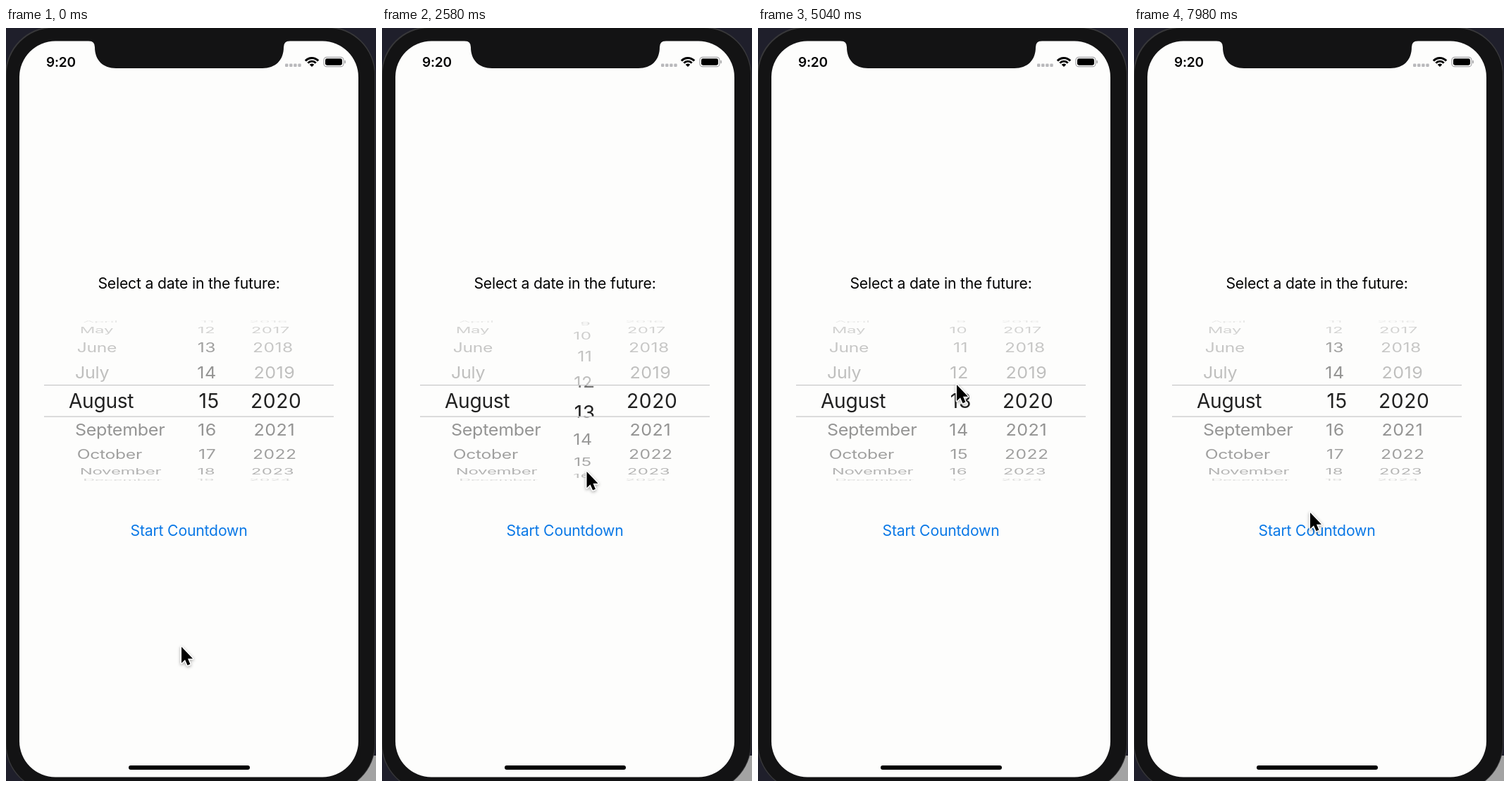
Write an HTML page with a canvas that moves like this. It is 525 px wide and 1066 px high and loops after 8000 ms.

```html
<!DOCTYPE html>
<html lang="en">
<head>
<meta charset="utf-8">
<style>
  html, body { margin: 0; width: 100%; height: 100%; overflow: hidden; background: #1f1f2b; }
  canvas { display: block; }
</style>
</head>
<body>
<canvas id="stage" width="525" height="1066"></canvas>
<script>
const ctx = document.getElementById('stage').getContext('2d');
const LOOP = 8000;
const MONTHS = 'January February March April May June July August September October November December'.split(' ');

// Tracks of [time, value], eased between neighbours
const cursorX = [[250, 249], [1100, 278], [1400, 278], [2500, 290.5], [4100, 290.5], [4800, 282], [6300, 282], [7000, 284], [7250, 284], [7960, 250]];
const cursorY = [[250, 876], [1100, 530], [1400, 530], [3074, 654], [4100, 654], [4800, 505], [5100, 505], [6000, 426], [6500, 426], [7000, 419], [7250, 419], [7960, 686]];
const dayTrack = [[1400, 15], [3074, 12], [3150, 12], [3550, 13], [5100, 13], [6253, 15]];

function sample(track, t) {
  const i = track.findIndex(key => key[0] > t);
  if (i === 0) return track[0][1];
  if (i < 0) return track[track.length - 1][1];
  const [t0, a] = track[i - 1], [t1, b] = track[i];
  const u = (t - t0) / (t1 - t0);
  return a + (b - a) * u * u * (3 - 2 * u);
}

function text(str, x, y, size, color, align = 'left', weight = 400, spacing = -0.009) {
  ctx.font = `${weight} ${size}px Inter, Roboto, sans-serif`;
  ctx.letterSpacing = size * spacing + 'px';
  ctx.textAlign = align;
  ctx.fillStyle = color;
  ctx.fillText(str, x, y);
}

function box(x, y, w, h, r, color) {
  ctx.beginPath();
  ctx.roundRect(x, y, w, h, r);
  ctx.fillStyle = color;
  ctx.fill();
}

function drawPhone() {
  ctx.fillStyle = '#1f1f2b';
  ctx.fillRect(0, 0, 525, 1066);
  ctx.fillStyle = '#a3a3a3';
  ctx.fillRect(480, 1030, 45, 36);
  box(-1, -2, 525, 1083, 68, '#38383a');
  box(0.5, 0, 522.5, 1080, 67, '#131314');
  box(19, 18.5, 481, 1042, 51, '#fdfdfc');

  ctx.beginPath();
  ctx.moveTo(117, 18);
  ctx.quadraticCurveTo(126, 18.5, 126, 27);
  ctx.bezierCurveTo(126, 46, 138, 57, 156, 57);
  ctx.lineTo(364, 57);
  ctx.bezierCurveTo(382, 57, 394, 46, 394, 27);
  ctx.quadraticCurveTo(394, 18.5, 403, 18);
  ctx.fillStyle = '#131314';
  ctx.fill();
  box(174, 1044, 172, 6, 3, '#000');
}

function drawStatus() {
  text('9:20', 57, 55, 19, '#000', 'left', 600);
  for (let i = 0; i < 4; i++) box(396 + i * 6.1, 50.5, 4.4, 4.4, 1.2, '#b9b9bc');

  const wedge = (r0, r1) => {
    ctx.beginPath();
    ctx.arc(434, 55, r1, -Math.PI * 0.76, -Math.PI * 0.24);
    ctx.arc(434, 55, r0, -Math.PI * 0.24, -Math.PI * 0.76, true);
    ctx.fillStyle = '#000';
    ctx.fill();
  };
  wedge(0, 4.6);
  wedge(6.4, 9.2);
  wedge(11, 14);

  ctx.beginPath();
  ctx.roundRect(451, 41.3, 28, 13.4, 4);
  ctx.strokeStyle = '#a5a5a7';
  ctx.lineWidth = 1.2;
  ctx.stroke();
  box(453, 43.3, 24, 9.4, 2.4, '#000');
  box(480.3, 45.7, 1.6, 4.6, 1, '#a5a5a7');
}

const CENTER_X = 259.5, CENTER_Y = 528, RADIUS = 113, STEP = 20.9 * Math.PI / 180;
const BAND_TOP = 505.5, BAND_BOTTOM = 550;

function drawRows(col, magnified) {
  const near = Math.round(col.value);
  for (let n = near - 5; n <= near + 5; n++) {
    const angle = (n - col.value) * STEP;
    if (Math.abs(angle) > 1.55) continue;
    const depth = Math.cos(angle);
    const scale = 1 / (1 + RADIUS * (1 - depth) / 1240);
    const enabled = n >= col.min;
    const alpha = magnified ? (enabled ? 0.87 : 0.55)
                            : (enabled ? 0.43 : 0.25) * depth ** 0.5;
    ctx.save();
    ctx.translate(CENTER_X, CENTER_Y + RADIUS * Math.sin(angle));
    ctx.scale(scale, scale * Math.max(depth, 0.12));
    text(col.label(n), col.x - CENTER_X, 9, 25.2, `rgba(0,0,0,${alpha})`, col.align, 400, col.spacing);
    ctx.restore();
  }
}

function clipped(y0, y1, draw) {
  ctx.save();
  ctx.beginPath();
  ctx.rect(50, y0, 420, y1 - y0);
  ctx.clip();
  draw();
  ctx.restore();
}

function drawPicker(day) {
  const columns = [
    { value: 7, min: 7, x: 97, pivot: 165, align: 'left', spacing: -0.011, label: n => MONTHS[(n + 12) % 12] },
    { value: day, min: 13, x: 299, pivot: 266, align: 'right', spacing: 0.022, label: n => String(n) },
    { value: 2020, min: 2020, x: 352, pivot: 394, align: 'left', spacing: 0.022, label: n => String(n) }
  ];
  for (const col of columns) {
    clipped(414, BAND_TOP, () => drawRows(col, false));
    clipped(BAND_BOTTOM, 641, () => drawRows(col, false));
    clipped(BAND_TOP, BAND_BOTTOM, () => {
      ctx.translate(col.pivot, CENTER_Y);
      ctx.scale(1.118, 1.118);
      ctx.translate(-col.pivot, -CENTER_Y);
      drawRows(col, true);
    });
  }
  ctx.fillStyle = '#c6c6c8';
  ctx.fillRect(54, 505, 411, 1.2);
  ctx.fillRect(54, 549.5, 411, 1.2);
}

const arrow = new Path2D('M0 0V23L5 18.2L8.6 26.2L12.4 24.6L9 16.8H16Z');

function drawCursor(x, y) {
  ctx.save();
  ctx.translate(x, y);
  ctx.lineJoin = 'round';
  ctx.lineWidth = 3;
  ctx.strokeStyle = '#fff';
  ctx.shadowColor = 'rgba(0,0,0,0.35)';
  ctx.shadowBlur = 4;
  ctx.shadowOffsetY = 1.5;
  ctx.stroke(arrow);
  ctx.shadowColor = 'transparent';
  ctx.fillStyle = '#000';
  ctx.fill(arrow);
  ctx.restore();
}

function frame(now) {
  const t = now % LOOP;
  drawPhone();
  drawStatus();
  text('Select a date in the future:', CENTER_X, 368.5, 21.2, '#000', 'center');
  drawPicker(sample(dayTrack, t));
  text('Start Countdown', CENTER_X, 718.5, 21.2, '#0a78e6', 'center');
  drawCursor(sample(cursorX, t), sample(cursorY, t));
  requestAnimationFrame(frame);
}
requestAnimationFrame(frame);
</script>
</body>
</html>
```
